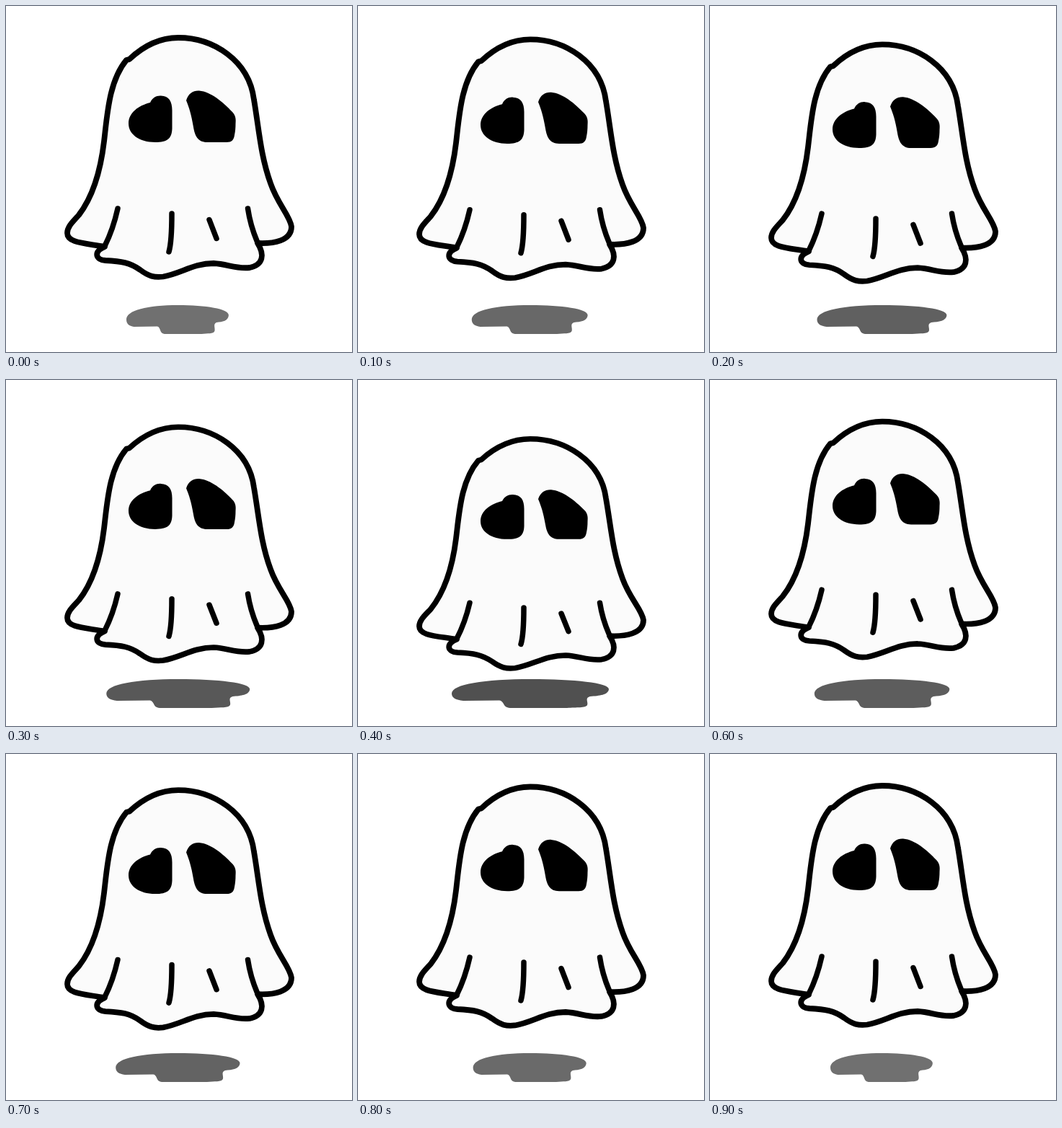
Animation, 480 px wide and 480 px high, one loop 1 s. Source, as an HTML page without scripts:

```html
<!DOCTYPE html>
<html lang="en">
<head>
<meta charset="utf-8">
<title>Floating ghost</title>
<style>
  /* --sink: 0 at the top of the bob, 1 at the bottom */
  @property --sink { syntax: "<number>"; inherits: true; initial-value: 0; }

  html, body { margin: 0; width: 100%; height: 100%; overflow: hidden; background: #fff; }
  svg { display: block; width: 100%; height: 100%; animation: bob 1s infinite; }

  @keyframes bob {
    0% { --sink: 0; animation-timing-function: steps(8); }
    40% { --sink: 1; animation-timing-function: steps(10); }
    90%, 100% { --sink: 0; }
  }

  .ghost {
    --drop: calc(var(--sink) * var(--sink));
    transform-origin: 0 0;
    transform: translateY(calc(var(--drop) * 39.65px)) scaleY(calc(1 - var(--drop) * 0.0413));
  }
  .shadow {
    --grey: calc(112 - var(--sink) * 32);
    fill: rgb(var(--grey), var(--grey), var(--grey));
    transform-origin: 236px 0;
    transform: scaleX(calc(0.651 + var(--sink) * 0.349));
  }
  .body, .fold { stroke: #000; stroke-width: 7.8; stroke-linecap: round; stroke-linejoin: round; }
  .body { fill: #fbfbfb; }
  .fold { fill: none; stroke-width: 7.5; }
</style>
</head>
<body>
<svg viewBox="0 0 480 480">
  <path class="shadow" d="M130 435C130 422 175 415 240 415C300 415 348 420 348 429C347 437 335 438 322 439C314 441 320 447 318 451C316 455 303 454 290 455H211C200 454 204 446 196 444.500L146 445C136 444 130 441 130 435Z"/>
  <g class="ghost">
    <path class="body" d="M167 75C143 104 140.500 150 136 188C131 230 121 264 101 290C93 299 85 306 85 315C85 329 110 329 137 334C121 341 124 352 138 353C160 354 172 356 186 366C198 375 206 377 218 375.500C243 371 260 357 288 357C308 358 318 365 338 363C357 359 359 345 349 329C371 330 396 326 396 306C394 291 377 275 367 246C353 207 351 171 344 130C337 75 287 44 239 44C212 44 190 56 171 74Z"/>
    <g class="fold">
      <path d="M155 281C151 299 145 317 137 333"/>
      <path d="M230 288C230 306 230 327 226 341"/>
      <path d="M282 296.500L292 322.500"/>
      <path d="M335.500 281C338 298 343 314 348.500 327"/>
    </g>
    <path d="M170 163C170 148 184 138 200 134C203 127 209 124 215 124.500C226 125 230.500 132 230.500 145V170C230 184 224 189 207 189C185 189 170 178 170 163Z"/>
    <path d="M250 131C253 121 260 117 268 117.500C284 119 301 133 314 147C319 152 319 158 318.500 163C318.500 169 318 174 317 179C316 186 313 189 306 189H279C266 189 262 180 260 168C257 150 254 141 250 131Z"/>
  </g>
</svg>
</body>
</html>
```
